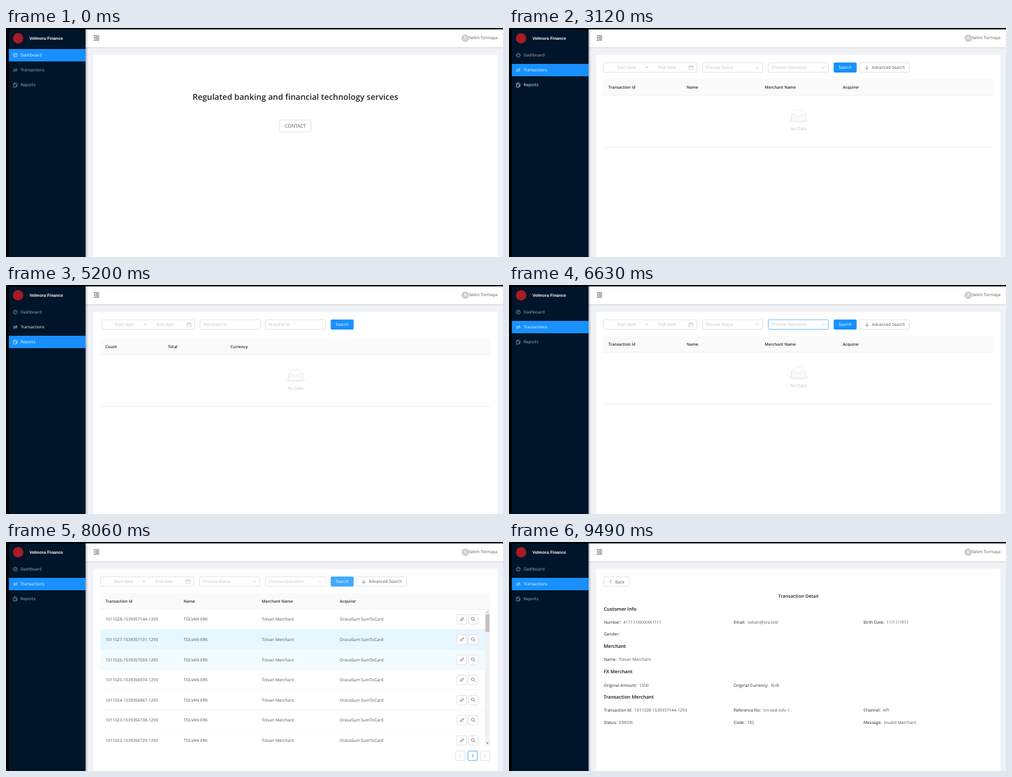
Recreate the animation shown at these times as an HTML page. Size 800 by 370 pixels, loop 9750 ms.

```html
<!DOCTYPE html>
<html lang="en">
<head>
<meta charset="utf-8">
<title>Payment dashboard</title>
<style>
  html, body { margin: 0; width: 100%; height: 100%; overflow: hidden; background: #000; }
  svg { display: block; width: 800px; height: 370px; }
  text { font-family: "Open Sans", "Noto Sans", sans-serif; font-size: 6.7px; fill: #555; text-rendering: geometricPrecision; }
  .dark { fill: #222; }
  .strong { fill: #222; font-weight: 600; font-size: 6.4px; }
  .hint { fill: #bfbfbf; }
  .line { fill: none; stroke-width: .7; stroke-linecap: round; stroke-linejoin: round; }
</style>
</head>
<body>
<svg id="stage" viewBox="0 0 800 370" xmlns="http://www.w3.org/2000/svg"></svg>
<script>
const LOOP = 9750, STEP = 130;
const BLUE = '#1890ff', SKY = '#40a9ff', GREY = '#d9d9d9';
const stage = document.getElementById('stage');

const text = (x, cy, s, attrs = '') => `<text x="${x}" y="${cy + 2.3}" ${attrs}>${s}</text>`;
const rect = (x, y, w, h, attrs = '') => `<rect x="${x}" y="${y}" width="${w}" height="${h}" ${attrs}/>`;
const box = (x, y, w, h, attrs = '') =>
  rect(x + .4, y + .4, w - .8, h - .8, `rx="1.8" fill="#fff" stroke="${GREY}" stroke-width=".8" ${attrs}`);
const line = (d, stroke = '#595959', attrs = '') => `<path class="line" d="${d}" stroke="${stroke}" ${attrs}/>`;
const rule = (x1, x2, y) => rect(x1, y, x2 - x1, .7, 'fill="#e8e8e8"');
const middle = 'text-anchor="middle"';
const page = (id, body) => `<g id="${id}" display="none">${body}</g>`;

// ---- sidebar and header ----
const menuIcons = [
  'M12.9 46.4a3.2 3.2 0 1 1 4.2 0ZM15 44.4l1.4-1.6M13.2 44h.2M15 42v.2',
  'M12 67h6l-1.5-1.5M18 69h-6l1.5 1.5',
  'M13.6 90v-1.2h2.6l1.6 1.6v3.8h-1.4M12.2 90.2h2.4l1.6 1.6v3.6h-4Z'
];
const menu = ['Dashboard', 'Transactions', 'Reports'].map((label, i) =>
  rect(4.6, 34 + 24 * i, 123.4, 20, `fill="${BLUE}" id="sel${i}"`) +
  `<g id="item${i}">${line(menuIcons[i], 'currentColor')}` +
  text(23.5, 44 + 24 * i, label, 'style="fill:currentColor;font-size:6.55px"') + '</g>').join('');

const shell = `
  <defs>
    <linearGradient id="side"><stop stop-color="#001529" stop-opacity=".3"/><stop offset="1" stop-color="#001529" stop-opacity="0"/></linearGradient>
    <linearGradient id="drop" x2="0" y2="1"><stop stop-color="#001529" stop-opacity=".1"/><stop offset="1" stop-color="#001529" stop-opacity="0"/></linearGradient>
    <clipPath id="rowsClip">${rect(152, 109, 627, 220)}</clipPath>
  </defs>
  ${rect(0, 0, 800, 370)}${rect(128, 2.5, 672, 367.5, 'fill="#f0f2f5"')}
  ${rect(128, 2.5, 672, 28.5, 'fill="#fff"')}${rect(128, 31, 672, 3, 'fill="url(#drop)"')}
  ${rect(140.3, 43.5, 651, 327, 'fill="#fff"')}${rect(128, 2.5, 4, 367.5, 'fill="url(#side)"')}
  ${rect(4.6, 2.5, 123.4, 367.5, 'fill="#001529"')}
  <circle cx="19.5" cy="16.6" r="8.4" fill="#a81c24"/>
  ${text(37.8, 16.6, 'Velmora Finance', `style="font:bold 6.8px 'Liberation Sans',sans-serif;fill:#fff"`)}
  ${menu}
  ${line('M141.5 12.7h8M144.8 15h4.7M144.8 17.3h4.7M141.5 19.6h8', '#404040', 'style="stroke-width:.9"')}
  <path d="M141.2 16.1l2.2-1.7v3.4Z" fill="#404040"/>
  <circle cx="739.3" cy="16.6" r="6" fill="#ccc"/>
  ${line('M736.6 19.4a2.7 2.7 0 0 1 5.4 0M737.7 15.1a1.6 1.6 0 1 0 3.2 0a1.6 1.6 0 1 0-3.2 0', '#fff')}
  ${text(791, 16, 'Selim Tormaya', 'text-anchor="end"')}`;

// ---- shared parts ----
const dateRange = (x, id) => box(x, 55.7, 150.5, 16.2, `id="${id}"`) +
  text(x + 37, 64, 'Start date', `class="hint" ${middle}`) + text(x + 70, 64, '~', middle) +
  text(x + 102.5, 64, 'End date', `class="hint" ${middle}`) +
  line(`M${x + 138} 61.5h6v5.6h-6ZM${x + 138} 63.3h6M${x + 139.6} 60.6v1.4M${x + 142.4} 60.6v1.4`, '#bfbfbf');
const field = (x, label, id) => box(x, 55.7, 97.8, 16.2, `id="${id}"`) + text(x + 5.8, 64, label, 'class="hint"');
const select = (x, label, id) => field(x, label, id) + line(`M${x + 86.5} 62.8l2.3 2.4l2.3-2.4`, '#bfbfbf');
const searchButton = id => rect(522.6, 55.7, 37, 16.2, `rx="2" fill="${BLUE}" id="${id}"`) +
  text(541, 64, 'Search', `${middle} style="fill:#fff"`);
const tableHead = (y, columns) => rect(152, y, 627, 26.2, 'fill="#fafafa"') + rule(152, 779, y + 26) +
  columns.map(([x, s]) => text(x, y + 13.5, s, 'class="strong"')).join('');
const empty = dy => `<g transform="translate(0 ${dy})"><g transform="translate(450 133) scale(.5)">
  <ellipse cx="32" cy="33" rx="32" ry="7" fill="#f5f5f5"/>
  <g stroke="${GREY}" fill="none"><path d="M55 12.8L44.9 1.3Q44 0 42.9 0H21.1Q20 0 19.1 1.3L9 12.8V22h46Z"/>
  <path fill="#fafafa" d="M41.6 16Q41.6 13 43.8 13H55V31Q55 35 52 35H12Q9 35 9 31V13H20.2Q22.4 13 22.4 16T24.6 18.9H39.4Q41.6 18.9 41.6 16Z"/></g></g>
  ${text(466, 162.5, 'No Data', `class="hint" ${middle}`)}${rule(152, 779, 192)}</g>`;

// ---- pages ----
const home = text(465.8, 113.4, 'Regulated banking and financial technology services',
  `${middle} class="strong" style="font-size:13.15px"`) +
  box(440, 148.3, 51.5, 20) + text(465.8, 159, 'CONTACT', `${middle} style="font-size:7.7px"`);

const suffixes = ['8-1539357144', '7-1539357101', '6-1539357059', '5-1539356974', '4-1539356867', '3-1539356738', '2-1539356729'];
const rows = suffixes.map((part, i) => {
  const cy = 125 + 32.6 * i;
  return rect(152, cy - 16.2, 619, 32.6, `fill="#fff" id="row${i}"`) + rule(152, 771, cy + 16) +
    text(160, cy, `101102${part}-1293`) + text(286, cy, 'TOLVAN ERK') +
    text(411.8, cy, 'Tolvan Merchant') + text(537.3, cy, 'OravaSum SumToCard') +
    box(725.5, cy - 8, 16.4, 16) + box(744, cy - 8, 16.4, 16, `id="view${i}"`) +
    line(`M730.8 ${cy + 3}l1.4-1.4M735.3 ${cy - 1.5}l1.5-1.5M731.8 ${cy + .2}l2 2M732.6 ${cy - .4}l1.5-1.6q1-.8 1.8 0t0 1.8l-1.6 1.6q-1 .8-1.7 0t0-1.8`) +
    line(`M749 ${cy - 1}a2.3 2.3 0 1 1 4.6 0a2.3 2.3 0 1 1-4.6 0M753 ${cy + .7}l2.3 2.3`, '#595959', `id="lens${i}"`);
}).join('');
const scrollbar = rect(771, 109, 8, 220, 'fill="#f1f1f1"') + rect(771.8, 117, 6.4, 28.3, 'fill="#c1c1c1"') +
  '<path d="M773.3 114.2l1.7-2l1.7 2Z" fill="#a3a3a3"/><path d="M773.3 324l1.7 2l1.7-2Z" fill="#505050"/>';
const pager = box(723.3, 337.4, 16, 16) + box(743.2, 337.4, 16, 16, `style="stroke:${BLUE}"`) + box(763.2, 337.4, 16, 16) +
  line('M732.3 343.3l-2 2.1l2 2.1M770.2 343.3l2 2.1l-2 2.1', '#bfbfbf') +
  text(751.2, 345.4, '1', `${middle} style="fill:${BLUE};font-weight:600"`);

const transactions = dateRange(152, 'date') + select(311, 'Choose Status', 'status') +
  select(417, 'Choose Operation', 'operation') + searchButton('search') +
  box(564.2, 55.7, 80.8, 16.2, 'id="advanced"') + line('M576 61.2v5.4M573.6 64.4l2.4 2.4l2.4-2.4') +
  text(584, 64, 'Advanced Search', 'id="advancedLabel"') +
  tableHead(82, [[160, 'Transaction Id'], [286, 'Name'], [411.8, 'Merchant Name'], [537.3, 'Acquirer']]) +
  page('noData', empty(0)) + page('results', `<g clip-path="url(#rowsClip)">${rows}${scrollbar}</g>${pager}`);

const reports = dateRange(153.8, 'reportDate') + field(312, 'Merchant Id', 'merchant') +
  field(417, 'Acquirer Id', 'acquirer') + searchButton('reportSearch') +
  tableHead(86, [[160, 'Count'], [260.8, 'Total'], [361.3, 'Currency']]) + empty(4);

const section = (cy, s) => text(152.5, cy, s, 'class="strong" style="font-size:7.65px;fill:#111"');
const entry = (x, cy, label, value) =>
  text(x, cy, `${label}:<tspan dx="3.6" fill="#555">${value}</tspan>`, 'class="dark"');
const detail = box(152, 55.7, 42, 16.2) + line('M164.8 61.4l-2.6 2.6l2.6 2.6') + text(171, 64.2, 'Back') +
  text(465.8, 87.7, 'Transaction Detail', `${middle} class="strong" style="font-size:7.4px"`) +
  section(108.3, 'Customer Info') + section(168.5, 'Merchant') +
  section(209.5, 'FX Merchant') + section(250.6, 'Transaction Merchant') +
  [
    [0, 130, 'Number', '411111XXXXXX1111'], [1, 130, 'Email', 'tolvan@ora.test'], [2, 130, 'Birth Date', '11/11/1971'],
    [0, 149, 'Gender', ''], [0, 190, 'Name', 'Tolvan Merchant'],
    [0, 231.2, 'Original Amount', '1500'], [1, 231.2, 'Original Currency', 'RUB'],
    [0, 272, 'Transaction Id', '1011028-1539357144-1293'], [1, 272, 'Reference No', 'trn-test-tolv-1'], [2, 272, 'Channel', 'API'],
    [0, 291.3, 'Status', 'ERROR'], [1, 291.3, 'Code', '182'], [2, 291.3, 'Message', 'Invalid Merchant']
  ].map(([column, cy, label, value]) => entry(152.7 + 209 * column, cy, label, value)).join('');

stage.innerHTML = shell + page('home', home) + page('transactions', transactions) +
  page('reports', reports) + page('detail', detail);

// ---- motion ----
const el = id => document.getElementById(id);
const set = (id, name, value) => el(id).setAttribute(name, value);
const show = (id, on) => set(id, 'display', on ? 'inline' : 'none');
const fade = (t, start, length = 260) => {
  const p = Math.min(1, Math.max(0, (t - start) / length));
  return p * p * (3 - 2 * p);
};
const pulse = (t, on, off, rise, fall) => fade(t, on, rise) - fade(t, off, fall);
const mix = (a, b, p) => 'rgb(' + [1, 3, 5].map(i => {
  const [u, v] = [a, b].map(c => parseInt(c.slice(i, i + 2), 16));
  return Math.round(u + (v - u) * p);
}) + ')';

function render(t) {
  const current = t < 1950 ? 'home' : t < 4030 ? 'transactions' : t < 5720 ? 'reports' : t < 9100 ? 'transactions' : 'detail';
  ['home', 'transactions', 'reports', 'detail'].forEach(id => show(id, id === current));

  const toReports = fade(t, 4030), back = fade(t, 5720);
  const selected = [1 - fade(t, 1950), fade(t, 1950) - toReports + back, toReports - back];
  const hovered = [0, pulse(t, 650, 2600, 390) + pulse(t, 4940, 5980), pulse(t, 2860, 4300)];
  selected.forEach((amount, i) => {
    set('sel' + i, 'opacity', amount);
    el('item' + i).style.color = mix('#b0b6bc', '#ffffff', Math.max(amount, hovered[i]));
  });

  const narrow = t < 2080 || (t >= 5720 && t < 5850);
  set('advanced', 'width', narrow ? 76 : 80);
  set('advancedLabel', 'x', narrow ? 580 : 584);

  set('date', 'stroke', mix(GREY, SKY, pulse(t, 6110, 6370)));
  set('status', 'stroke', mix(GREY, SKY, pulse(t, 6300, 6450, 130, 170)));
  set('operation', 'stroke', mix(GREY, SKY, pulse(t, 6450, 6640, 180)));
  set('search', 'fill', mix(BLUE, SKY, fade(t, 6640)));

  const loaded = t >= 7280;
  show('noData', !loaded);
  show('results', loaded);
  const rowGlow = [fade(t, 8190), pulse(t, 7935, 8190, 120), pulse(t, 7410, 7935)];
  rowGlow.forEach((amount, i) => set('row' + i, 'fill', mix('#ffffff', '#e6f7ff', amount)));
  const view = fade(t, 8580);
  set('view0', 'stroke', mix(GREY, SKY, view));
  set('lens0', 'stroke', mix('#595959', SKY, view));
}

function tick() {
  const t = performance.now() % LOOP;
  render(Math.floor(t / STEP) * STEP);
  requestAnimationFrame(tick);
}
tick();
</script>
</body>
</html>
```
